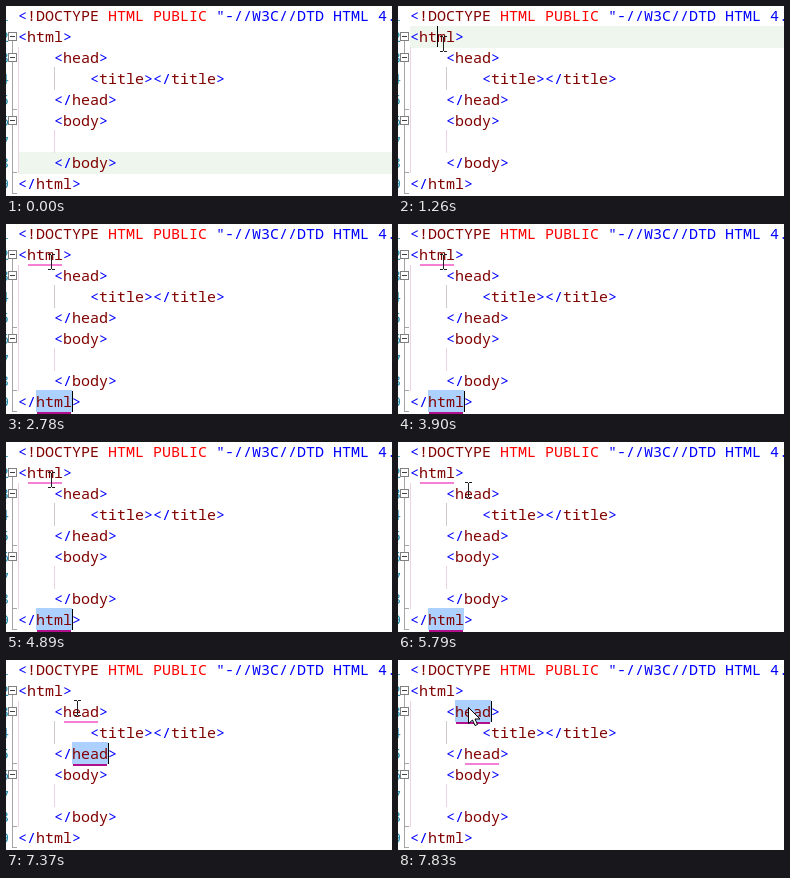
Write an HTML page with a canvas that moves like this. It is 386x190 px and loops after 8000 ms.

```html
<!DOCTYPE html>
<html lang="en">
<head>
<meta charset="utf-8">
<title>Tag matching</title>
<style>
html, body { margin: 0; width: 100%; height: 100%; overflow: hidden; background: #fff; }
canvas { display: block; }
</style>
</head>
<body>
<canvas id="stage" width="386" height="190"></canvas>
<script>
const ctx = document.getElementById('stage').getContext('2d');
const LOOP = 8000, STEP = 60, LINE = 21, CHAR = 9, LEFT = 12;
const BLUE = '#0000ff', MAROON = '#800000', RED = '#ff0000';

const colX = col => LEFT + col * CHAR;
const lineTop = line => 20 + (line - 2) * LINE;

const source = [
  [1, 0, '<', BLUE], [1, 1, '!DOCTYPE', MAROON], [1, 10, 'HTML PUBLIC', RED],
  [1, 22, '"-//W3C//DTD HTML 4.', BLUE],
  ...tag(2, 0, 'html'), ...tag(3, 4, 'head'),
  ...tag(4, 8, 'title'), ...tag(4, 15, 'title', true),
  ...tag(5, 4, 'head', true), ...tag(6, 4, 'body'),
  ...tag(8, 4, 'body', true), ...tag(9, 0, 'html', true)
];

// Line and column where each matched name starts
const HTML_OPEN = [2, 1], HTML_CLOSE = [9, 2];
const HEAD_OPEN = [3, 5], HEAD_CLOSE = [5, 6];

const line = (at, row, caretCol) => ({ at, row, caretCol });
const match = (at, selected, other, caret = true) => ({ at, selected, other, caret });

const states = [
  line(0, 8),
  line(1200, 2),
  line(1260, 2, 3),
  match(1790, HTML_CLOSE, HTML_OPEN),
  match(2190, HTML_OPEN, HTML_CLOSE),
  match(2720, HTML_CLOSE, HTML_OPEN, false),
  match(2780, HTML_CLOSE, HTML_OPEN),
  match(3310, HTML_OPEN, HTML_CLOSE),
  match(3840, HTML_CLOSE, HTML_OPEN, false),
  match(3900, HTML_CLOSE, HTML_OPEN),
  match(4430, HTML_OPEN, HTML_CLOSE),
  match(4890, HTML_CLOSE, HTML_OPEN),
  match(5420, HTML_CLOSE, HTML_OPEN, false),
  line(5980, 3, 6),
  match(6380, HEAD_CLOSE, HEAD_OPEN, false),
  match(6510, HEAD_CLOSE, HEAD_OPEN),
  match(6910, HEAD_OPEN, HEAD_CLOSE),
  match(7370, HEAD_CLOSE, HEAD_OPEN),
  match(7770, HEAD_OPEN, HEAD_CLOSE, false),
  match(7830, HEAD_OPEN, HEAD_CLOSE)
];

function tag(row, col, name, closing = false) {
  const open = closing ? '</' : '<';
  const nameCol = col + open.length;
  return [
    [row, col, open, BLUE],
    [row, nameCol, name, MAROON],
    [row, nameCol + name.length, '>', BLUE]
  ];
}

function rect(color, x, y, w, h) {
  ctx.fillStyle = color;
  ctx.fillRect(x, y, w, h);
}

function text(row, x, str, color) {
  ctx.fillStyle = color;
  [...str].forEach((c, i) => ctx.fillText(c, x + i * CHAR, lineTop(row) + 16));
}

function drawMargin() {
  const gray = '#a5a5a5';
  for (let row = 1; row <= 9; row++) text(row, -6, String(row), '#2b91af');
  rect(gray, 6, 35, 1, 153);
  for (const row of [5, 8, 9]) rect(gray, 6, lineTop(row) + 20, 5, 1);
  for (const row of [2, 3, 6]) {
    const y = lineTop(row) + 6;
    rect('#808080', 2, y, 9, 9);
    rect('#ffffff', 3, y + 1, 7, 7);
    rect('#404040', 4, y + 4, 5, 1);
  }
}

function drawGuides() {
  const pink = '#ecd2e2';
  rect(pink, 12, lineTop(3), 1, LINE * 6);
  rect('#cfc8cc', 48, lineTop(4) - 1, 1, LINE + 2);
  rect(pink, 48, lineTop(7) - 1, 1, LINE + 2);
}

function drawCaret(row, col) {
  rect('#000000', colX(col), lineTop(row), 1, LINE);
}

function drawSelection([row, col]) {
  rect('#add1ff', colX(col), lineTop(row) - 1, 4 * CHAR, LINE + 1);
}

function underline([row, col], color, drop) {
  rect(color, colX(col) + 1, lineTop(row) + drop, 4 * CHAR - 2, 2);
}

function drawBeam(x, y) {
  rect('#202020', x, y - 6, 1, 14);
  for (const end of [y - 7, y + 8]) {
    rect('#202020', x - 3, end, 3, 1);
    rect('#202020', x + 1, end, 3, 1);
  }
}

function drawArrow(x, y) {
  const points = [[0, 0], [0, 16], [4, 12.5], [6.5, 18], [9, 17], [6.5, 11.5], [11.5, 11.5]];
  ctx.beginPath();
  points.forEach(([dx, dy]) => ctx.lineTo(x + dx + 0.5, y + dy + 0.5));
  ctx.closePath();
  ctx.fillStyle = '#ffffff';
  ctx.fill();
  ctx.strokeStyle = '#000000';
  ctx.lineWidth = 1;
  ctx.stroke();
}

function glide(t, start, end, [x0, y0], [x1, y1]) {
  const stepped = Math.floor((t - start) / STEP) * STEP;
  const p = Math.min(1, Math.max(0, stepped / (end - start)));
  const eased = p * p * (3 - 2 * p);
  return [Math.round(x0 + (x1 - x0) * eased), Math.round(y0 + (y1 - y0) * eased)];
}

function mouseAt(t) {
  if (t < 1200) return glide(t, 400, 1000, [342, 52], [45, 37]);
  if (t < 5920) return glide(t, 5360, 5780, [45, 37], [70, 47]);
  return [71, 47];
}

function drawMouse(t, state) {
  if (t < 400) return;
  const [x, y] = mouseAt(t);
  const overSelection = state.selected === HTML_OPEN || state.selected === HEAD_OPEN;
  if (overSelection) drawArrow(x - 1, y);
  else drawBeam(x, y);
}

function draw(t) {
  const state = states.findLast(s => s.at <= t);
  rect('#ffffff', 0, 0, 386, 190);
  if (state.row) rect('#eef6ee', LEFT, lineTop(state.row), 386, LINE + 1);
  drawGuides();
  if (state.selected) drawSelection(state.selected);
  drawMargin();
  for (const [row, col, str, color] of source) text(row, colX(col), str, color);
  if (state.selected) {
    const [row, col] = state.selected;
    underline(state.selected, '#b0108c', LINE);
    underline(state.other, '#f47fd4', LINE - 1);
    if (state.caret) drawCaret(row, col + 4);
  }
  if (state.caretCol) drawCaret(state.row, state.caretCol);
  drawMouse(t, state);
}

function frame(now) {
  ctx.font = '15px "Noto Sans Mono", "DejaVu Sans Mono", monospace';
  draw(now % LOOP);
  requestAnimationFrame(frame);
}
requestAnimationFrame(frame);
</script>
</body>
</html>
```
